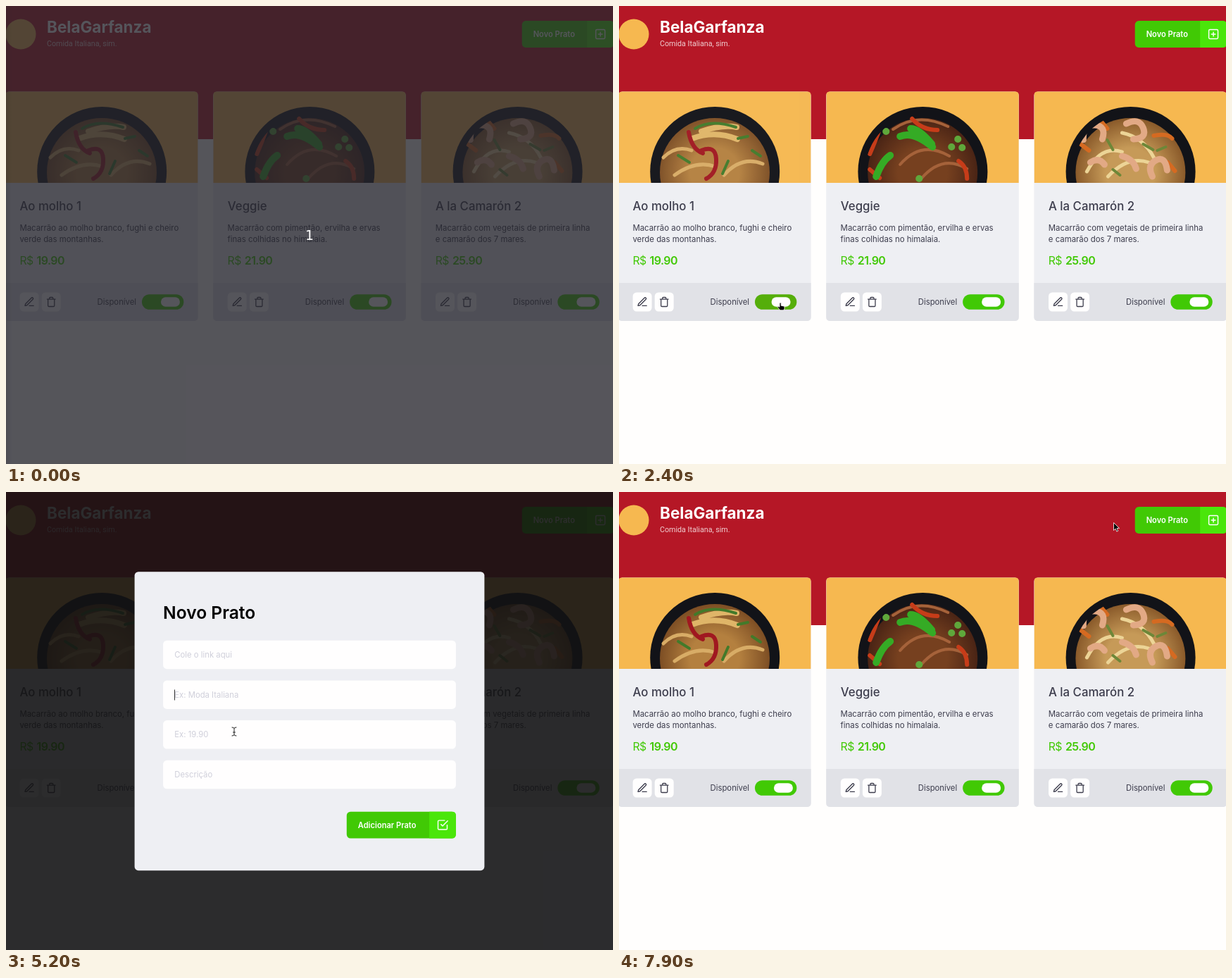
These frames come from a looping animation (862x650 px, 8000 ms). An HTML page:

```html
<!DOCTYPE html>
<html lang="pt">
<head>
<meta charset="utf-8">
<title>Cardápio</title>
<style>
  html, body { margin: 0; height: 100%; overflow: hidden; background: #fffefd; }
  svg { display: block; width: 100%; height: 100%; font-family: Inter, sans-serif; }
  .line { fill: none; stroke-linecap: round; stroke-linejoin: round; }
</style>
</head>
<body>
<svg id="stage" viewBox="0 0 862 650"></svg>
<script>
const LOOP = 8000;
const GREEN = '#41c905', BRIGHT = '#4ae60a', INK = '#3d3d4d', PANEL = '#eeeff3', WHITE = '#fffefe';
const GREEN_RGB = [65, 201, 5], RED_RGB = [190, 28, 36];
const CARD_WIDTH = 273.6, CARD_STEP = 295.2, KNOB_ON = 220.95, KNOB_TRAVEL = 21.6;
const ICONS = {
  pencil: 'M12 20h9M16.5 3.5a2.12 2.12 0 0 1 3 3L7 19l-4 1 1-4z',
  trash: 'M3 6h18M19 6v14a2 2 0 0 1-2 2H7a2 2 0 0 1-2-2V6m3 0V4a2 2 0 0 1 2-2h4a2 2 0 0 1 2 2v2',
  plus: 'M5 3h14a2 2 0 0 1 2 2v14a2 2 0 0 1-2 2H5a2 2 0 0 1-2-2V5a2 2 0 0 1 2-2zM12 8v8M8 12h8',
  check: 'M9 11l3 3L22 4M21 12v7a2 2 0 0 1-2 2H5a2 2 0 0 1-2-2V5a2 2 0 0 1 2-2h11'
};

const rect = (x, y, w, h, fill, r = 0, extra = '') =>
  `<rect x="${x}" y="${y}" width="${w}" height="${h}" rx="${r}" fill="${fill}" ${extra}/>`;
const text = (x, y, string, size, weight, fill, extra = '') =>
  `<text x="${x}" y="${y}" font-size="${size}" font-weight="${weight}" fill="${fill}" ${extra}>${string}</text>`;
const line = (d, color, width) =>
  `<path class="line" d="${d}" stroke="${color}" stroke-width="${width}"/>`;
const icon = (name, cx, cy, scale, color) =>
  `<g transform="translate(${cx} ${cy}) scale(${scale}) translate(-12 -12)">${line(ICONS[name], color, 2)}</g>`;

function button(x, y, width, height, label, iconName) {
  const split = x + width - 37.8;
  return rect(x, y, width, height, GREEN, 5.4) +
    `<path d="M${split} ${y}h32.4q5.4 0 5.4 5.4v${height - 10.8}q0 5.4-5.4 5.4h-32.4z" fill="${BRIGHT}"/>` +
    text(x + 16, y + height / 2 + 4, label, 11.1, 600, '#fff') +
    icon(iconName, split + 18.9, y + height / 2, .72, '#fff');
}

// Food pictures reduced to a plate, a soft mound and a few strokes.
const dishes = [
  {
    title: 'Ao molho 1', price: '19.90', tones: ['#b4803f', '#7d4e24'],
    about: ['Macarrão ao molho branco, fughi e cheiro', 'verde das montanhas.'],
    strokes: [
      ['M105 188q32-12 64 1M118 178q30-10 50-6', '#dfb568', 8],
      ['M64 215q18-18 40-10M80 240q30-22 58-12M150 240q25-28 55-16', '#d8ac66', 5],
      ['M100 179q4 24 20 30M118 205q20-8 21 12t-14 28', '#a01820', 6],
      ['M109 174q22-14 58-2M85 212l16 10M156 220l-8 18M190 205l12 8M170 188l14-3', '#427a2a', 4]
    ]
  },
  {
    title: 'Veggie', price: '21.90', tones: ['#76401f', '#4a2415'],
    about: ['Macarrão com pimentão, ervilha e ervas', 'finas colhidas no himalaia.'],
    strokes: [
      ['M95 175q35-25 78-4M105 225q30-35 70-12M135 245q30-35 65-14', '#a5623a', 4],
      ['M77 172q-8 22-15 38M122 160q14 16 36 16M62 232l14 12M188 220q12 8 12 25', '#c63c19', 6],
      ['M105 185q18-8 46 15M120 174q12 0 30 22M91 212q-12 8-20 30', '#35ab25', 10],
      ['M178 200l.1 0M187 189l.1 0M193 201l.1 0M85 178l.1 0M132 245l.1 0', '#5fa83b', 10]
    ]
  },
  {
    title: 'A la Camarón 2', price: '25.90', tones: ['#c69a58', '#8a5a2a'],
    about: ['Macarrão com vegetais de primeira linha', 'e camarão dos 7 mares.'],
    strokes: [
      ['M75 235q20-38 50-28M105 242q28-30 58-20M125 180q30 6 45 35', '#ecd496', 5],
      ['M170 184q20-4 26 4M92 160l12 14M190 222l10 12M65 195l13 10', '#d56a21', 6],
      ['M70 190q-1-22 16-21t11 20M131 167q18-9 24 6t-14 16M125 213q16 4 20 18M168 242q-8-16 5-23t16 14M80 222q12-8 20 3', '#e2a985', 9],
      ['M104 190l8 14M155 196l14 8M112 232l10 8M175 205l12-5', '#6d8738', 4]
    ]
  }
];

function card(dish, index) {
  const [inner, outer] = dish.tones;
  return `<g transform="translate(${index * CARD_STEP - 1} 0)">
    ${rect(0, 121.5, CARD_WIDTH, 325.5, PANEL, 5.4)}
    <path d="M0 393h${CARD_WIDTH}v48.6q0 5.4-5.4 5.4H5.4q-5.4 0-5.4-5.4z" fill="#e1e2e7"/>
    <g id="photo${index}" clip-path="url(#photoArea)">
      ${rect(0, 121, CARD_WIDTH, 131, '#f6b850')}
      <radialGradient id="mound${index}"><stop offset=".45" stop-color="${inner}"/><stop offset="1" stop-color="${outer}"/></radialGradient>
      <circle cx="137.2" cy="235" r="92" fill="#121318"/>
      <ellipse cx="137" cy="236" rx="78" ry="77" fill="url(#mound${index})"/>
      <g clip-path="url(#plate)">${dish.strokes.map(s => line(...s)).join('')}</g>
    </g>
    ${text(20.6, 290, dish.title, 16.8, 500, INK)}
    ${dish.about.map((row, i) => text(20.4, 319 + i * 16.2, row, 11.4, 400, INK)).join('')}
    ${text(20.4, 367, 'R$', 15.8, 400, GREEN, 'letter-spacing="-.6"')}
    ${text(44.6, 367, dish.price, 16, 600, GREEN, 'letter-spacing="-.6"')}
    ${rect(20.6, 406.5, 27, 27, WHITE, 5.4)}${icon('pencil', 34.1, 420, .675, INK)}
    ${rect(51.7, 406.5, 27, 27, WHITE, 5.4)}${icon('trash', 65.2, 420, .65, INK)}
    ${text(186, 424, 'Disponível', 11.3, 400, INK, `id="label${index}" text-anchor="end"`)}
    ${rect(193.95, 409.2, 59.4, 21.6, GREEN, 10.8, `id="track${index}"`)}
    ${rect(KNOB_ON, 413.25, 27, 13.5, WHITE, 6.75, `id="knob${index}"`)}
  </g>`;
}

const fields = ['Cole o link aqui', 'Ex: Moda Italiana', 'Ex: 19.90', 'Descrição'];
const fieldTop = i => 210.7 + i * 56.7;

document.getElementById('stage').innerHTML = `
  <defs>
    <clipPath id="photoArea"><path d="M0 251.1V126.9q0-5.4 5.4-5.4h262.8q5.4 0 5.4 5.4v124.2z"/></clipPath>
    <clipPath id="plate"><circle cx="137.2" cy="235" r="82"/></clipPath>
    <linearGradient id="edgeFade"><stop stop-opacity=".14"/><stop offset="1" stop-opacity="0"/></linearGradient>
  </defs>
  ${rect(0, 0, 862, 650, '#fffefd')}
  ${rect(0, 0, 862, 189, '#b51726')}
  <circle cx="21" cy="40" r="21.5" fill="#f6b850"/>
  ${text(58, 38, 'BelaGarfanza', 22.5, 700, '#fff')}
  ${text(58, 57, 'Comida Italiana, sim.', 10.7, 400, '#f0cfd2', 'font-family="Roboto, sans-serif"')}
  ${button(732.7, 21.1, 130.3, 37.8, 'Novo Prato', 'plus')}
  ${dishes.map(card).join('')}
  ${rect(0, 0, 8, 650, 'url(#edgeFade)', 0, 'id="edge"')}
  <g id="modal">
    ${rect(0, 0, 862, 650, 'rgba(18,18,20,.89)')}
    ${rect(182.6, 113.2, 496.8, 424, PANEL, 5.4)}
    ${text(223, 180, 'Novo Prato', 24.6, 600, '#000')}
    ${fields.map((hint, i) => rect(223.1, fieldTop(i), 415.8, 40.5, WHITE, 5.4) +
      text(239.3, fieldTop(i) + 24.3, hint, 11.3, 400, '#cfcfda')).join('')}
    ${button(483.8, 453.7, 155.1, 37.8, 'Adicionar Prato', 'check')}
    ${rect(239, 0, 1, 15, '#333', 0, 'id="caret"')}
  </g>
  <g id="pointer">
    <path id="arrow" d="M0 0v11l2.6-2.4 1.7 4 1.9-.8-1.7-3.9h3.5z" fill="#000" stroke="#fff" stroke-width=".8"/>
    <path id="hand" d="M-2 .5q1-1.2 2.2 0v3.7l4.8 1v3.3l-1.2 2.3h-5l-3.6-4.4 1-1.2 1.8 1z" fill="#000" stroke="#fff" stroke-width=".8"/>
    <path id="beam" class="line" d="M-3-6q3 0 3 1.5q0-1.5 3-1.5M0-4.5v9M-3 6q3 0 3-1.5q0 1.5 3 1.5M-1.5 1h3" stroke="#222"/>
  </g>
  <g id="veil">
    ${rect(0, 0, 862, 650, 'rgba(38,38,45,.78)')}
    ${text(431, 332, '1', 19, 400, '#fff', 'text-anchor="middle" font-family="DejaVu Sans, sans-serif"')}
  </g>`;

const $ = id => document.getElementById(id);
const show = (id, visible) => $(id).setAttribute('visibility', visible ? 'inherit' : 'hidden');
const progress = (t, start, duration) => Math.min(1, Math.max(0, (t - start) / duration));
const ease = p => 1 - (1 - p) ** 2.3;
const mix = (a, b, p) => a + (b - a) * p;

// Pointer stops: arrival time, x, y, departure time.
const stops = [
  [500, 141, 245, 500], [700, 271, 363, 850], [1100, 230, 421, 2550],
  [3000, 855, 111, 3020], [3100, 766, 62, 3110], [3200, 807, 44.5, 3450],
  [3600, 738, 102, 3720], [4100, 328, 244, 4230], [4400, 327, 269, 4530],
  [4700, 325, 283, 4930], [5200, 324, 340, 5300], [5400, 326, 347, 5530],
  [5700, 364, 414, 6030], [6130, 366, 403, 6130], [6600, 570, 473, 6830],
  [7200, 383, 235, 7430], [7700, 702.5, 43.5, LOOP]
];

function pointerAt(t) {
  const next = stops.findIndex(s => s[0] > t);
  if (next < 0) return stops[stops.length - 1].slice(1, 3);
  const from = stops[Math.max(0, next - 1)], to = stops[next];
  const p = progress(t, from[3], to[0] - from[3]);
  return [mix(from[1], to[1], p), mix(from[2], to[2], p)];
}

function pointerKind(x, y, modalOpen) {
  const inside = (left, top, right, bottom) => x >= left && x <= right && y >= top && y <= bottom;
  if (!modalOpen) return inside(193, 409, 253, 431) || inside(733, 21, 862, 59) ? 'hand' : 'arrow';
  if (inside(484, 454, 639, 491)) return 'hand';
  return fields.some((_, i) => inside(223, fieldTop(i), 639, fieldTop(i) + 40.5)) ? 'beam' : 'arrow';
}

function render(t) {
  const offAt = 1370, onAt = 2180;
  const offAmount = duration => ease(progress(t, offAt, duration)) - ease(progress(t, onAt, duration));
  const slide = offAmount(400);
  $('photo0').setAttribute('opacity', 1 - .7 * offAmount(300));
  $('knob0').setAttribute('x', KNOB_ON - KNOB_TRAVEL * slide);
  $('track0').setAttribute('fill', `rgb(${GREEN_RGB.map((c, i) => Math.round(mix(c, RED_RGB[i], slide)))})`);
  $('label0').textContent = t >= offAt && t < onAt ? 'Indisponível' : 'Disponível';

  const modalOpen = t > 3420 && t < 7900;
  show('modal', modalOpen);
  $('modal').setAttribute('opacity', progress(t, 3420, 170));
  show('caret', modalOpen && t >= 5000 && t < 5900);
  $('caret').setAttribute('y', t < 5400 ? 280.5 : 337);

  const [x, y] = pointerAt(t), kind = pointerKind(x, y, modalOpen);
  $('pointer').setAttribute('transform', `translate(${x} ${y})`);
  for (const id of ['arrow', 'hand', 'beam']) show(id, t >= 500 && id === kind);

  show('edge', t < 1300);
  show('veil', t < 100);
}

function tick() {
  render(performance.now() % LOOP);
  requestAnimationFrame(tick);
}
tick();
</script>
</body>
</html>
```
